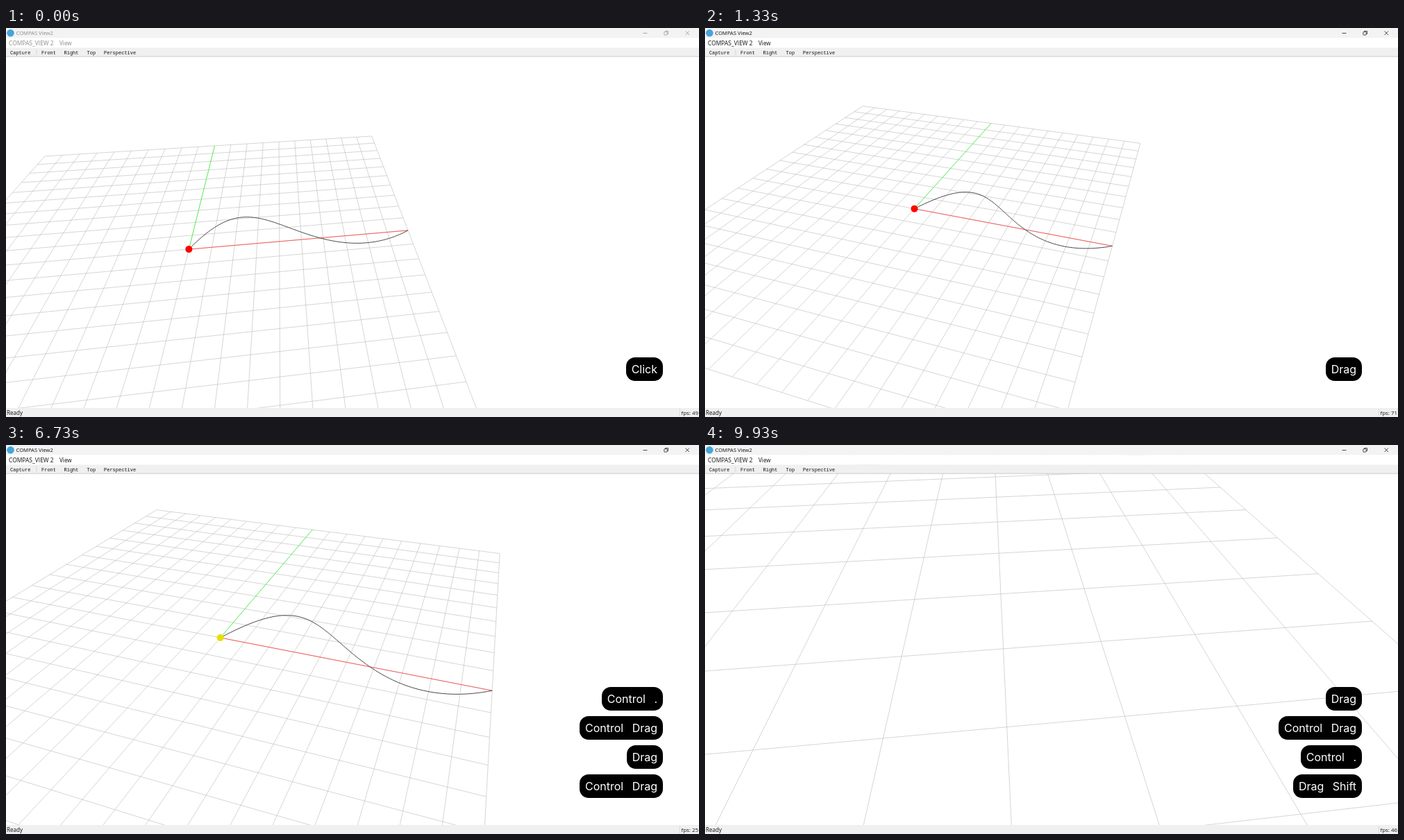
An HTML page with a canvas that plays this animation: 998 by 561 pixels, repeating every 9990 ms.

```html
<!DOCTYPE html>
<html lang="en">
<head>
<meta charset="utf-8">
<title>Viewer</title>
<style>
  html, body { margin: 0; width: 100%; height: 100%; overflow: hidden; background: #fff; }
  canvas, svg { position: absolute; left: 0; top: 0; }
  svg { font: 8.15px "Open Sans", sans-serif; fill: #111; }
  .tools { font: 7px "Liberation Mono", monospace; }
  .icons { fill: none; stroke: #222; stroke-width: .8; }
  .idle .focus { fill: #8c8c8c; }
  .idle .icons { stroke: #999; }
  #keys {
    position: absolute; left: 598px; top: 209px; width: 348px; height: 300px;
    display: flex; flex-direction: column; justify-content: flex-end; align-items: flex-end; gap: 8px;
    font: 16px/34px Inter, sans-serif; color: #fff;
  }
  #keys div { display: flex; gap: 12.4px; padding: 0 8px; border-radius: 13px; background: #000; }
</style>
</head>
<body>
<canvas id="view" width="998" height="561"></canvas>
<svg id="ui" width="998" height="561">
  <path fill="#f3f3f3" d="M0 0h998v14.5H0z"/>
  <path fill="#fff" d="M0 14.5h998v14H0z"/>
  <path fill="#f0f0f0" d="M0 28.5h998v12.5H0zM0 548h998v13H0z"/>
  <path fill="#bcbcbc" d="M0 40.8h998v.8H0z"/>
  <path fill="#d0d0d0" d="M43.5 31h.8v8h-.8z"/>
  <circle cx="6.5" cy="7.2" r="5.3" fill="#45a5dc"/>
  <g class="focus">
    <text x="14.5" y="10" font-size="7.6">COMPAS View2</text>
    <text x="4" y="25" font-size="8.45">COMPAS_VIEW 2</text>
    <text x="77" y="25">View</text>
  </g>
  <g class="icons">
    <path d="M917.5 7.5h6M978.5 4.5l5.5 5.5m0-5.5l-5.5 5.5M949.5 5.5v-1h4v4h-1"/>
    <rect x="947.8" y="5.7" width="4.4" height="4.4" rx=".8"/>
  </g>
  <g class="tools">
    <text x="6" y="38">Capture</text>
    <text x="51" y="38">Front</text>
    <text x="83.5" y="38">Right</text>
    <text x="116.5" y="38">Top</text>
    <text x="141" y="38">Perspective</text>
  </g>
  <text x="1" y="558">Ready</text>
  <path id="rule" fill="#d4d4d4" d="M0 549h.8v11h-.8z"/>
  <text id="fps" x="997" y="558" text-anchor="end" font-size="7.9"></text>
</svg>
<div id="keys"></div>
<script>
const $ = id => document.getElementById(id);
const ctx = $('view').getContext('2d');
const LOOP = 9990, RATE = 15 / 1000, FOCAL = 612, CX = 499, CY = 294.5, NEAR = .05;

// Times below count ticks of 1/15 s. Camera: tick, yaw, pitch, target x y z, distance
const START = [7.295, -.5, .58, 18.97], CURVE = [5, .75, 0, 15.59], POINT = [0, 0, 0, 1.507];
const camera = [
  [0, -7.8, 38.7, ...START], [4, -7.8, 38.7, ...START],
  [10, 28.8, 34.65, ...START], [19, 16.25, 40, ...START], [57, 16.25, 40, ...START],
  [58, 16.25, 40, ...CURVE], [117, 16.25, 40, ...CURVE],
  [118, 16.25, 40, ...POINT], [132, 16.25, 40, ...POINT],
  [134, 13, 40.2, ...POINT], [135, 13, 40.2, ...POINT],
  [139, -6.6, 40.95, ...POINT], [141, -6.6, 40.95, ...POINT],
  [149, -6.6, 40.95, 6.241, .862, 1.813, 1.507]
];

// Key labels, oldest first
const labels = [
  [0, 'Click'], [5, 'Drag'], [52, 'Drag|Control'], [58, 'Drag|Control .'],
  [71, 'Drag|Control .|Control'], [74, 'Drag|Control .|Control Drag'],
  [88, 'Drag|Control .|Control Drag|Drag'],
  [94, 'Control .|Control Drag|Drag|Control Drag'],
  [112, 'Control|Control Drag|Drag|Control Drag|Control'],
  [118, 'Control|Control Drag|Drag|Control Drag|Control .'],
  [123, 'Control Drag|Drag|Control Drag|Control .'],
  [133, 'Control|Drag|Control Drag|Control .|Drag'],
  [140, 'Control|Drag|Control Drag|Control .|Drag Shift Click'],
  [142, 'Control|Drag|Control Drag|Control .|Drag Shift'],
  [145, 'Drag|Control Drag|Control .|Drag Shift']
];
const rates = [[0, 49], [5, 1], [20, 71], [31, 70], [52, 2], [88, 25], [112, 35], [133, 1], [136, 2], [144, 46]];

// Selection boxes: first tick, tick of full size, last tick, x, y, width, height
const boxes = [
  [31, 35, 36, 301, 199, 180, 52], [74, 79, 80, 400, 222, 120, 78],
  [88, 92, 94, 290, 240, 110, 60], [95, 100, 101, 400, 203, 120, 87]
];

const latest = (list, n) => list.filter(e => e[0] <= n).pop()[1];

function pose(n) {
  const i = camera.findIndex(k => k[0] > n);
  if (i < 0) return camera[camera.length - 1];
  const a = camera[i - 1], b = camera[i];
  const s = (n - a[0]) / (b[0] - a[0]), e = s * s * (3 - 2 * s);
  return a.map((v, j) => v + (b[j] - v) * e);
}

// Returns a function from ground coordinates to camera space (right, down, depth)
function lens([, yaw, pitch, tx, ty, tz, dist]) {
  const a = yaw * Math.PI / 180, p = pitch * Math.PI / 180;
  const ca = Math.cos(a), sa = Math.sin(a), cp = Math.cos(p), sp = Math.sin(p);
  return (x, y) => {
    const dx = x - tx, dy = y - ty, fwd = dy * ca - dx * sa;
    return [dx * ca + dy * sa, tz * cp - fwd * sp, dist + fwd * cp + tz * sp];
  };
}

const screen = ([x, y, z]) => [CX + FOCAL * x / z, CY + FOCAL * y / z];

function segment(a, b) {
  if (a[2] < NEAR && b[2] < NEAR) return;
  const cut = (p, q) => p[2] >= NEAR ? p :
    p.map((v, i) => v + (q[i] - v) * (NEAR - p[2]) / (q[2] - p[2]));
  ctx.moveTo(...screen(cut(a, b)));
  ctx.lineTo(...screen(cut(b, a)));
}

function stroke(color, width, build) {
  ctx.strokeStyle = color;
  ctx.lineWidth = width;
  ctx.beginPath();
  build();
  ctx.stroke();
}

function bezier(t) {
  const u = 1 - t;
  return [9 * u * u * t + 15 * u * t * t + 10 * t ** 3, 9 * t * u * (2 - 3 * t)];
}

function drawScene(n) {
  const cam = lens(pose(n));
  ctx.fillStyle = '#fff';
  ctx.fillRect(0, 0, 998, 561);
  stroke('#b9b9b9', .6, () => {
    for (let i = -10; i <= 10; i++) {
      segment(cam(i, -10), cam(i, 10));
      segment(cam(-10, i), cam(10, i));
    }
  });
  stroke('#ff3030', .75, () => segment(cam(0, 0), cam(10, 0)));
  stroke('#30ff30', .75, () => segment(cam(0, 0), cam(0, 10)));

  const curveOn = n >= 36 && n < 80 || n >= 94 && n < 101;
  stroke(curveOn ? '#cccc00' : '#484848', 1, () => {
    for (let i = 0; i < 100; i++)
      segment(cam(...bezier(i / 100)), cam(...bezier((i + 1) / 100)));
  });

  const origin = cam(0, 0);
  if (origin[2] > NEAR) {
    ctx.fillStyle = n >= 94 ? '#e6e000' : '#ff0000';
    ctx.beginPath();
    ctx.arc(...screen(origin), 5, 0, 7);
    ctx.fill();
  }

  for (const [from, full, to, x, y, w, h] of boxes) {
    if (n < from || n >= to) continue;
    const s = Math.min(1, (n - from + 1) / (full - from + 1));
    stroke('#777', .8, () => ctx.rect(x + .5, y + .5, w * s, h * s));
  }
}

let shown = -1;
function frame(now) {
  const n = Math.floor((now % LOOP + 4) * RATE);
  if (n !== shown) {
    shown = n;
    drawScene(n);
    $('ui').classList.toggle('idle', n < 5);
    const fps = latest(rates, n);
    $('fps').textContent = 'fps: ' + fps;
    $('rule').setAttribute('transform', `translate(${fps > 9 ? 970 : 974.5})`);
    $('keys').innerHTML = latest(labels, n).split('|').map(row =>
      `<div>${row.split(' ').map(k => `<span>${k}</span>`).join('')}</div>`).join('');
  }
}

const begin = performance.now();
function tick() {
  frame(performance.now() - begin);
  requestAnimationFrame(tick);
}
tick();
</script>
</body>
</html>
```
